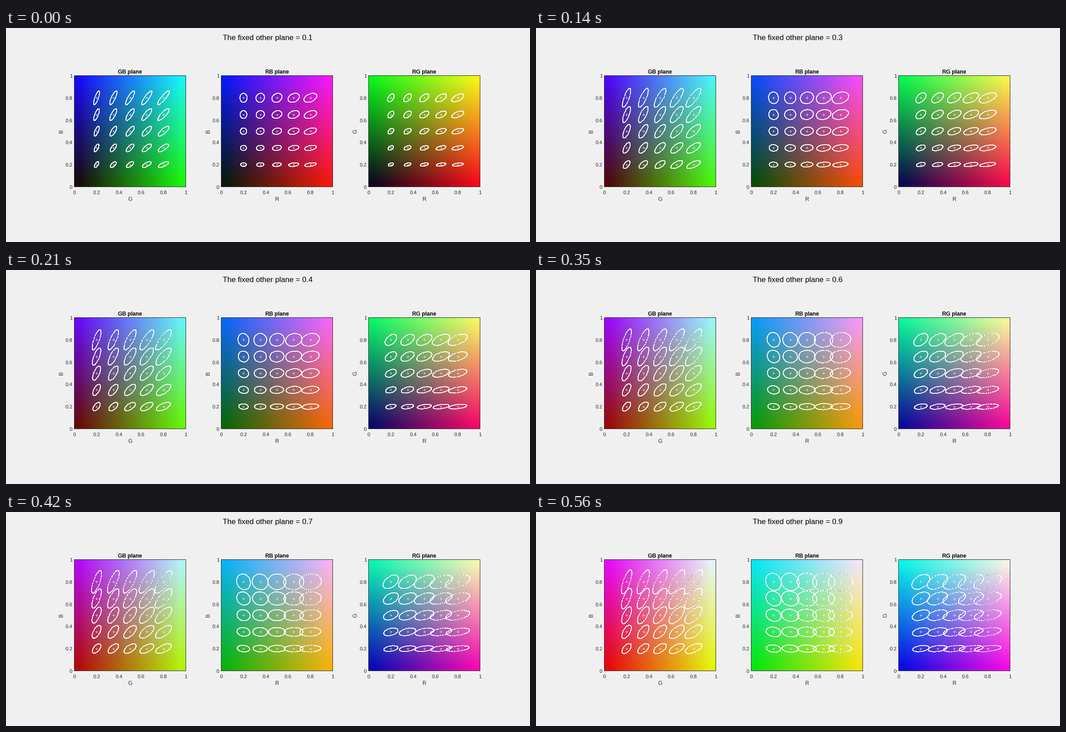
Write a matplotlib script that moves like this. It is 1170x479 px and loops after 0.63 s.

```python
import numpy as np
import matplotlib.pyplot as plt
from matplotlib.animation import FuncAnimation

W, H, DPI = 1170, 479, 64
PT = 72 / DPI  # points per pixel
SIDE, TOP = 249, 106.5
BOTTOM = TOP + SIDE
INK = "#262626"
STEPS = 9

plt.rcParams["font.family"] = "Liberation Sans"

fig = plt.figure(figsize=(W / DPI, H / DPI), dpi=DPI, facecolor="#f0f0f0")
ax = fig.add_axes([0, 0, 1, 1])
ax.axis("off")

grid = np.linspace(0, 1, 5)
gx, gy = (g.reshape(-1, 1) for g in np.meshgrid(grid, grid))
theta = np.append(np.linspace(0, 2 * np.pi, 61), np.nan)  # nan splits the loops
ramp = np.clip((np.arange(SIDE) + 0.5) / SIDE, 0.04, 0.96)
RAMP_X, RAMP_Y = np.meshgrid(ramp, ramp)


def label(x, y, text, size, color=INK, **kw):
    kw = {"ha": "center", "va": "baseline", **kw}
    return ax.text(x, y, text, fontsize=size * PT, color=color, **kw)


class Plane:
    """Colour square with a 5 x 5 grid of ellipses.

    wide, tall: half sizes of the lowest ellipse; widen, rise: their growth.
    lean: correlation and its slopes along x and y; drop: its loss over time.
    """

    def __init__(self, column, axes, wide, widen, tall, rise, lean, drop, ease):
        self.axes, self.ease = axes, ease
        self.wide, self.widen = wide, widen
        self.tall, self.rise = tall, rise
        self.lean, self.drop = lean, drop
        self.left = np.floor(152.3 + 328.4 * column) + 0.5
        self.cx = self.left + SIDE * (0.2 + 0.6 * gx)
        self.cy = BOTTOM - SIDE * (0.2 + 0.6 * gy)
        self.build()

    def build(self):
        left, right, mid = self.left, self.left + SIDE, self.left + SIDE / 2
        self.image = ax.imshow(self.colors(0.1), origin="lower", aspect="auto",
                               extent=(left, right, BOTTOM, TOP),
                               interpolation="nearest")
        ax.plot([left, right, right, left, left],
                [BOTTOM, BOTTOM, TOP, TOP, BOTTOM],
                color=INK, lw=PT, snap=False, zorder=2)
        ax.plot(self.cx, self.cy, "+", color="white", ms=6.5 * PT,
                mew=0.8 * PT, alpha=0.9, zorder=3)
        self.line, = ax.plot([], [], color="black", lw=PT, zorder=4)
        self.dots, = ax.plot([], [], "s", color="white", ms=2 * PT, mew=0,
                             zorder=5)

        label(mid, 102, f"{self.axes} plane", 12.1, "black", weight="bold")
        label(mid, 387.3, self.axes[0], 12.1)
        label(left - 26, mid - left + TOP, self.axes[1], 12.1, rotation=90,
              rotation_mode="anchor")
        for value in np.linspace(0, 1, 6):
            text = f"{value:.1g}"
            label(left + SIDE * value, 371.5, text, 11.2)
            label(left - 4.5, BOTTOM - SIDE * value + 4.5, text, 11.2, ha="right")

    def colors(self, fixed):
        rgb = np.full(RAMP_X.shape + (3,), fixed)
        rgb[..., "RGB".index(self.axes[0])] = RAMP_X
        rgb[..., "RGB".index(self.axes[1])] = RAMP_Y
        return rgb

    def ellipses(self, progress):
        grow = progress ** self.ease
        base, along_x, along_y = self.lean
        half_w = (self.wide + 6.5 * gx + 1.6 * gy
                  + self.widen * grow * (0.85 + 0.3 * gx))
        half_h = self.tall * (1 + 1.4 * gy) * (1 + self.rise * grow)
        corr = (base + along_x * gx + along_y * gy
                - self.drop * grow * (0.6 + 0.8 * gx))
        x = self.cx + half_w * np.cos(theta)
        y = self.cy - half_h * np.cos(theta - np.arccos(corr))
        return x.ravel(), y.ravel()

    def update(self, fixed, progress):
        self.image.set_data(self.colors(fixed))
        points = self.ellipses(progress)
        self.line.set_data(*points)
        self.dots.set_data(*points)


planes = [
    Plane(0, "GB", wide=4.9, widen=6.2, tall=6.4, rise=0.75,
          lean=(0.6, 0.1, 0.18), drop=0.08, ease=0.5),
    Plane(1, "RB", wide=6.3, widen=11.2, tall=4.2, rise=0.92,
          lean=(0, 0.4, 0), drop=0.27, ease=0.82),
    Plane(2, "RG", wide=5.6, widen=15, tall=3.7, rise=0.88,
          lean=(0.38, 0.1, 0.1), drop=0.07, ease=0.82),
]
title = label(584.7, 26.8, "", 16.75, "black")
ax.set_xlim(0, W)
ax.set_ylim(H, 0)


def draw(step):
    fixed = (step + 1) / 10
    title.set_text(f"The fixed other plane = {fixed:.1f}")
    for plane in planes:
        plane.update(fixed, step / (STEPS - 1))


anim = FuncAnimation(fig, draw, frames=STEPS, interval=70, repeat=True,
                     repeat_delay=0)
plt.show()
```
